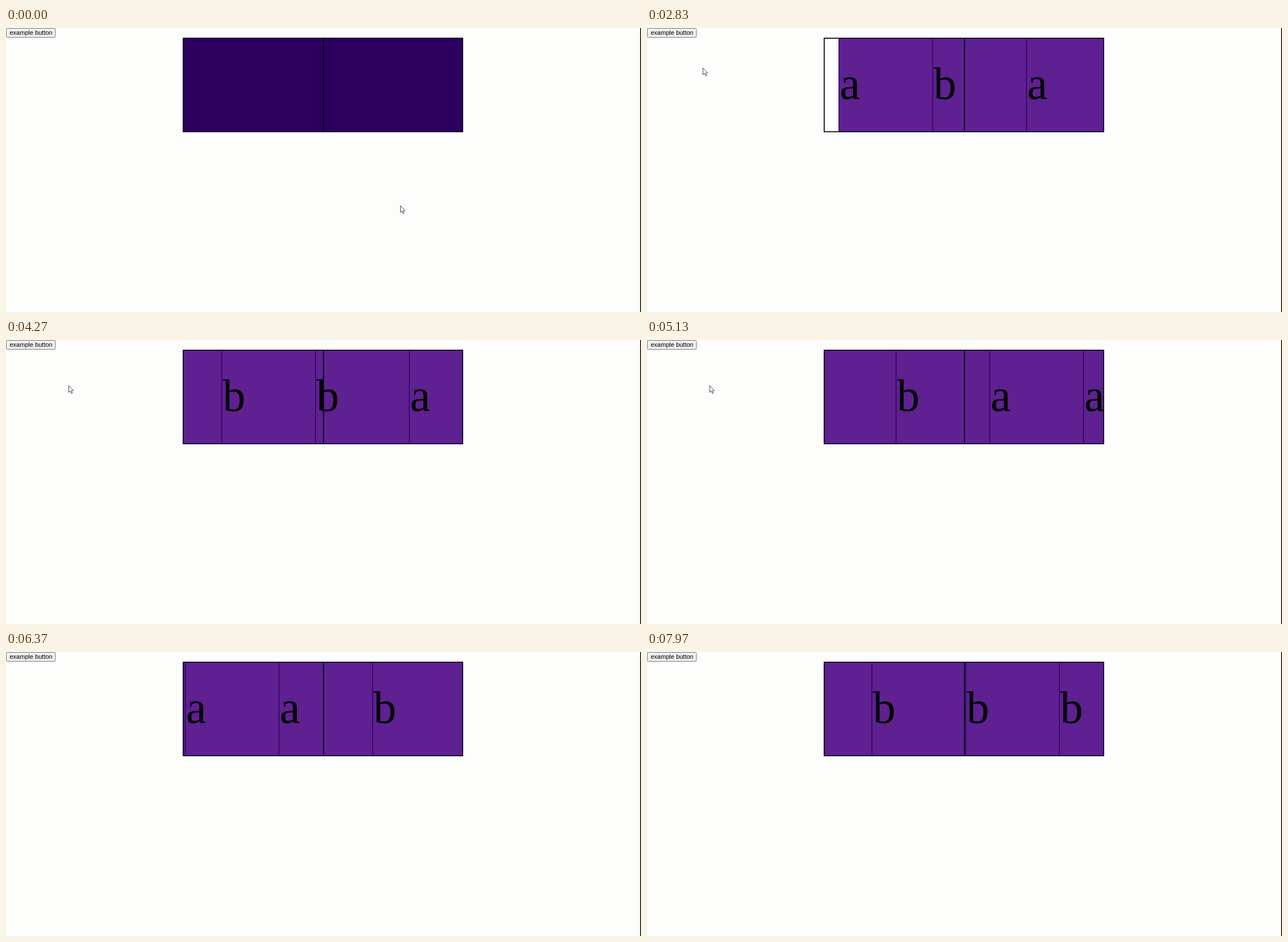
Animation of 1118 by 501 pixels, one loop 8 s. Source, as an HTML page:

```html
<!DOCTYPE html>
<html lang="en">
<head>
<meta charset="utf-8">
<title>Spinner</title>
<style>
  html, body { margin: 0; width: 100%; height: 100%; overflow: hidden; background: #fdfdfc; }
  svg { display: block; width: 1118px; height: 501px; }
  .letter { font: 80px "Liberation Serif", "Times New Roman", serif; }
  .label { font: 11px "Liberation Sans", Arial, sans-serif; }
</style>
</head>
<body>
<svg viewBox="0 0 1118 501">
  <defs><clipPath id="window"><rect x="312" y="18" width="492" height="165"/></clipPath></defs>
  <rect width="1118" height="501" fill="#fdfdfc"/>
  <rect x="1116.6" width="1.4" height="501" fill="#000"/>
  <rect id="button" x=".5" y=".5" width="86.5" height="16" rx="2" fill="#efefef" stroke="#767676"/>
  <text class="label" x="6.5" y="12.4">example button</text>
  <rect x="312" y="18" width="492" height="165" fill="#fff"/>
  <g clip-path="url(#window)"><g id="strip"></g></g>
  <rect id="cover" x="312" y="18" width="492" height="165" fill="#2d005f"/>
  <rect x="312" y="18" width="492" height="165" fill="none" stroke="#06001a" stroke-width="1.7"/>
  <rect x="558" y="18" width="2" height="165" fill="#06001a"/>
  <path id="cursor" d="M.5 .5V12.4L3.2 9.9L5.2 14.6L7 13.8L5 9.3H8.8Z" fill="#fff" stroke="#33334a" stroke-width=".9"/>
</svg>
<script>
const LOOP = 8000, FRAME = 100 / 3, PITCH = 165, START = 353.5;
const PRESS = 2400, SPIN = 2516, CURSOR_GONE = 5750;
const letters = "ababbabbaababbaababbabaababaabbbab";

// The strip speeds up evenly, so the root of its distance grows in nearly straight lines: [time, root]
const speedUp = [[SPIN, 0], [4267, 21.65], [6367, 48.46], [7433, 62.21], [7967, 68.87]];

// Pointer moves: begin, end, destination
const home = { x: 694, y: 313 };
const moves = [
  { begin: 330, end: 630, x: 690, y: 303 },
  { begin: 1470, end: 2070, x: 52, y: 8 },
  { begin: 2530, end: 2800, x: 98, y: 70 },
  { begin: 3070, end: 3300, x: 110, y: 80 },
];

const $ = id => document.getElementById(id);
const strip = $("strip"), cover = $("cover"), cursor = $("cursor"), button = $("button");

strip.innerHTML = [...letters].map((c, i) => {
  const x = i * PITCH;
  return `<rect x="${x - 0.7}" y="18" width="${PITCH + 0.5}" height="165" fill="#5f2091"/>` +
    `<rect x="${x - 0.7}" y="18" width="1.4" height="165" fill="#2d005f"/>` +
    `<text class="letter" x="${x + 1.5}" y="124.5">${c}</text>`;
}).join("");

const progress = (t, a, b) => Math.min(1, Math.max(0, (t - a) / (b - a)));
const smooth = u => u * u * (3 - 2 * u);

function distance(t) {
  let root = 0;
  for (let i = 1; i < speedUp.length; i++) {
    const [t0, r0] = speedUp[i - 1], [t1, r1] = speedUp[i];
    root += (r1 - r0) * progress(t, t0, t1);
  }
  return root * root;
}

function pointerAt(t) {
  let { x, y } = home;
  for (const m of moves) {
    const u = smooth(progress(t, m.begin, m.end));
    x += (m.x - x) * u;
    y += (m.y - y) * u;
  }
  return { x: Math.round(x), y: Math.round(y) };
}

const show = (el, on) => el.setAttribute("visibility", on ? "visible" : "hidden");

function draw(time) {
  // the picture advances 30 times per second
  const t = Math.floor((time + 4) / FRAME) * FRAME;
  strip.setAttribute("transform", `translate(${(START - distance(t)).toFixed(2)} 0)`);
  show(cover, t < SPIN);

  const { x, y } = pointerAt(t);
  cursor.setAttribute("transform", `translate(${x} ${y})`);
  show(cursor, t < CURSOR_GONE);

  const over = x < 87 && y < 17, down = t > PRESS && t < SPIN;
  button.setAttribute("fill", down ? "#f5f5f5" : over ? "#e5e5e5" : "#efefef");
}

const begin = performance.now();
function tick() {
  draw((performance.now() - begin) % LOOP);
  requestAnimationFrame(tick);
}
tick();
</script>
</body>
</html>
```
